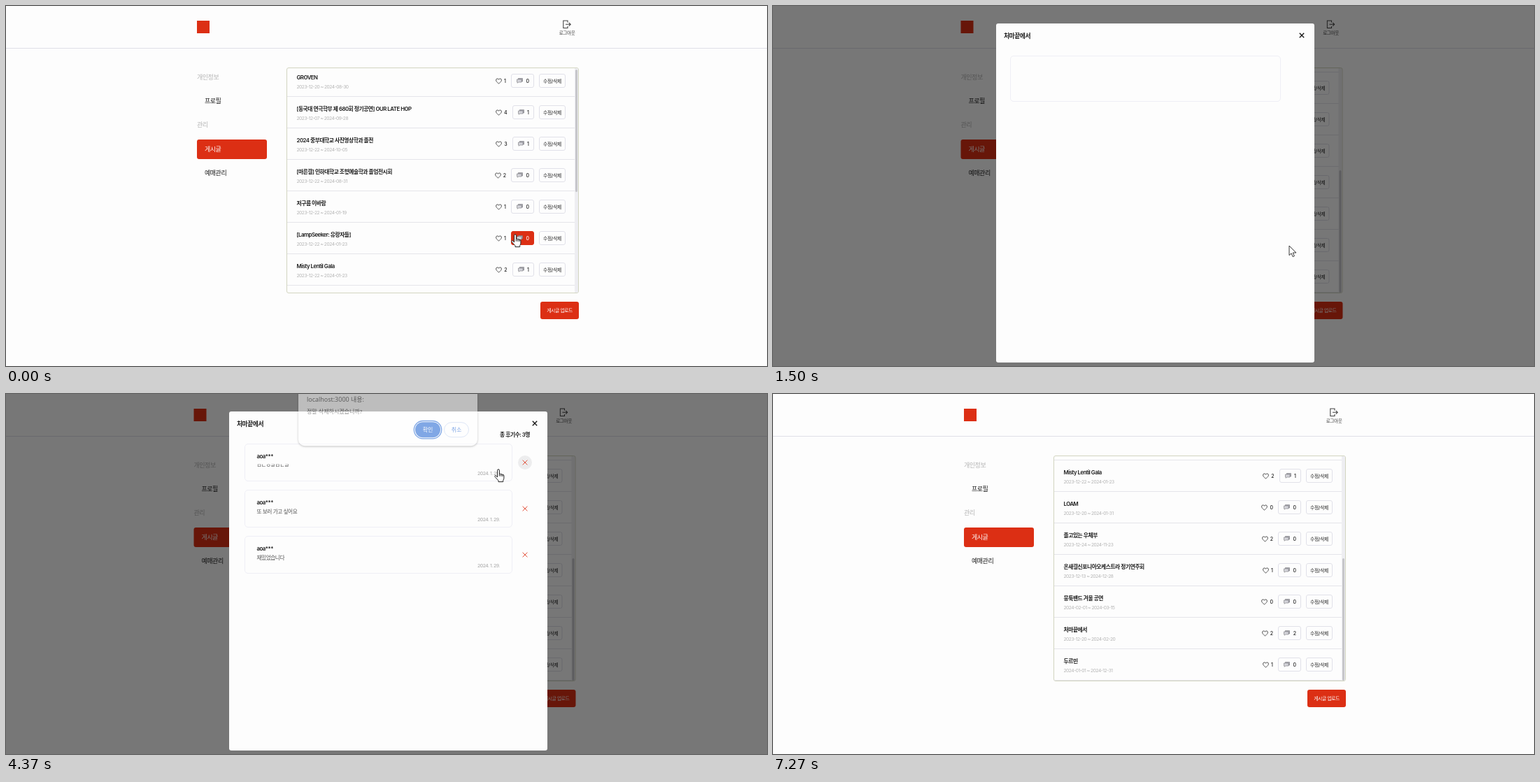
Animation of 1088x515 px, one loop 8.03 s. Source, as an HTML page:

```html
<!DOCTYPE html>
<html lang="ko">
<head>
<meta charset="utf-8">
<title>게시글 관리</title>
<style>
html, body { margin: 0; width: 100%; height: 100%; overflow: hidden; background: #fdfdfd; }
body { font-family: Inter, "Noto Sans CJK KR", sans-serif; letter-spacing: -.03em; color: #1c1c1c; }
#stage { position: relative; width: 1088px; height: 515px; overflow: hidden; background: #fdfdfd; }
#stage div, #stage svg { position: absolute; box-sizing: border-box; }
.t { line-height: 10px; white-space: nowrap; }
.mid { text-align: center; }
.right { text-align: right; }
#page { inset: 0; }
#line { left: 0; top: 60px; width: 1088px; height: 1px; background: #dfdfe8; }
#logo { left: 273px; top: 21px; width: 18px; height: 18px; background: #dc2f14; }
.menu { font-size: 9px; }
.dim { color: #b4b4b4; }
.red { background: #dc2f14; border-radius: 3px; color: #fdfdfd; }
#box { left: 401px; top: 88px; width: 418px; height: 323px; border: 1px solid #d2d5c0; border-radius: 3px; overflow: hidden; }
#rows { left: 0; top: -3.7px; width: 413px; }
.row { left: 0; width: 413px; height: 45px; border-bottom: 1px solid #e5e5ea; }
.row .name { left: 13.5px; top: 11.7px; font-size: 7.8px; font-weight: 600; }
.row .date { left: 13.5px; top: 25.7px; font-size: 6.7px; color: #b4b4b4; }
#stage .tools { right: 15px; top: 12px; height: 20px; display: flex; align-items: center; gap: 7px; font-size: 7px; font-weight: 500; letter-spacing: 0; }
#stage .tools *, #stage .tools svg { position: static; flex: none; }
.like { display: flex; align-items: center; gap: 3px; }
.badge, .edit { height: 20px; border: 1px solid #e1e1e9; border-radius: 3px; display: flex; align-items: center; justify-content: center; }
.badge { padding: 0 6px 0 7px; gap: 4.5px; }
.edit { width: 38px; font-size: 6.7px; letter-spacing: -.03em; }
#track { right: 0; top: 0; width: 5px; height: 321px; background: #eeeef2; }
#thumb { right: 1px; top: 2px; width: 3px; height: 175px; border-radius: 2px; background: #c6c6ca; }
#shade { inset: 0; background: rgba(0, 0, 0, .53); }
#modal { left: 319px; top: 25px; width: 455px; height: 485px; background: #fdfdfd; border-radius: 3px; }
.card { left: 22px; width: 383px; height: 54px; border: 1px solid #efeff6; border-radius: 5px; }
#blank { left: 20px; top: 46px; width: 387px; height: 66px; border: 1px solid #efeff6; border-radius: 5px; }
.half { clip-path: inset(3px 0 0 0); }
.dot { left: 413px; width: 20px; height: 20px; border-radius: 50%; }
#ask { left: 418px; top: -10px; width: 256px; height: 90px; border-radius: 9px; background: #fff; color: #3c3c3c;
  box-shadow: 0 1px 3px rgba(0, 0, 0, .45); font-family: "Open Sans", "Noto Sans CJK KR", sans-serif; letter-spacing: 0; }
.pill { top: 56px; width: 36px; height: 22px; line-height: 20px; border-radius: 11px; font-size: 8px; text-align: center; }
.yes { left: 167px; background: #0b57d0; color: #fff; line-height: 22px; box-shadow: 0 0 0 1px #fff, 0 0 0 2.3px #0b57d0; }
.no { left: 208px; border: 1px solid #c3d3f2; color: #0b57d0; }
#cursor { left: 0; top: 0; }
#cursor svg { overflow: visible; }
</style>
</head>
<body>
<div id="stage">
  <div id="line"></div>
  <div id="page">
    <div id="logo"></div>
    <svg style="left:796px;top:20px" width="12" height="13" fill="none" stroke="#444" stroke-width="1.1">
      <path d="M7 3.5V1H.8v10.5H7V9M4 6.3h7M8.8 3.9l2.4 2.4-2.4 2.4"/>
    </svg>
    <div class="t mid" style="left:782px;top:33.5px;width:40px;font-size:6.7px;color:#444">로그아웃</div>
    <div class="t menu dim" style="left:273px;top:97px">개인정보</div>
    <div class="t menu" style="left:284px;top:131px">프로필</div>
    <div class="t menu dim" style="left:273px;top:165px">관리</div>
    <div class="red" style="left:273px;top:191px;width:100px;height:28px"></div>
    <div class="t menu" style="left:284px;top:200px;color:#fff;font-weight:500">게시글</div>
    <div class="t menu" style="left:284px;top:234px">예매관리</div>
    <div id="box">
      <div id="rows"></div>
      <div id="track"><div id="thumb"></div></div>
    </div>
    <div class="red mid" style="left:764px;top:423px;width:55px;height:25px;line-height:25px;font-size:6.9px;font-weight:500">게시글 업로드</div>
  </div>
  <div id="shade"></div>
  <div id="modal">
    <div class="t" style="left:11px;top:13px;font-size:8.8px;font-weight:600">처마끝에서</div>
    <svg style="left:433px;top:13px" width="8" height="8" stroke="#111" stroke-width="1.3"><path d="M.8.8l6.4 6.4M7.2.8L.8 7.2"/></svg>
    <div id="blank"></div>
    <div id="reviews" style="inset:0">
      <div id="total" class="t right" style="right:25px;top:27.5px;font-size:7.8px;font-weight:600"></div>
      <div id="cards" style="inset:0"></div>
    </div>
  </div>
  <div id="ask">
    <div class="t" style="left:12px;top:19px;font-size:9px">localhost:3000 내용:</div>
    <div class="t" style="left:12px;top:36px;font-size:8px">정말 삭제하시겠습니까?</div>
    <div class="pill yes">확인</div>
    <div class="pill no">취소</div>
  </div>
  <div id="cursor">
    <svg id="arrow" width="12" height="18" fill="#fff" stroke="#222" stroke-width=".9" stroke-linejoin="round">
      <path d="M0 0V13.6L3.1 10.8 5.2 15.7 7.4 14.7 5.3 10H9.9Z"/>
    </svg>
    <svg id="hand" style="left:-6px;top:-1px" width="15" height="20" fill="#fff" stroke="#222" stroke-width="1" stroke-linejoin="round">
      <path d="M4.6 12V2.2a1.4 1.4 0 0 1 2.8 0V7.6q1.2-1.1 2.3.2 1.4-.7 2.2.6 2-.4 2 1.6V13.4q0 1.8-1.2 3V18.6H6V16.8L1.1 11.5q-.8-1.4.5-1.9 1.1-.2 3 2.4ZM7.4 7.6v3M9.7 7.8v3M11.9 8.4v2.6"/>
    </svg>
  </div>
</div>
<script>
const LOOP = 8030, SCROLL = 260, OPEN = 1500, LOADED = 1630, CLOSE = 5700;
const DELETED = [3300, 4950];
const $ = id => document.getElementById(id);
const clamp = v => Math.max(0, Math.min(1, v));
const ramp = (t, a, b) => clamp((t - a) / (b - a));
const within = (t, a, b) => t >= a && t < b;
const show = (el, on) => { el.style.visibility = on ? 'inherit' : 'hidden'; };

const posts = [
  ['GROVEN', '2023-12-20 ~ 2024-08-30', 1, 0],
  ['[동국대 연극학부 제 680회 정기공연] OUR LATE HOP', '2023-12-07 ~ 2024-09-28', 4, 1],
  ['2024 중부대학교 사진영상학과 졸전', '2023-12-22 ~ 2024-10-05', 3, 1],
  ['[마른결] 인하대학교 조형예술학과 졸업전시회', '2023-12-22 ~ 2024-08-31', 2, 0],
  ['저구름 이바람', '2023-12-22 ~ 2024-01-19', 1, 0],
  ['[LampSeeker: 유랑자들]', '2023-12-22 ~ 2024-01-23', 1, 0],
  ['Misty Lentil Gala', '2023-12-22 ~ 2024-01-23', 2, 1],
  ['LOAM', '2023-12-20 ~ 2024-01-31', 0, 0],
  ['졸고있는 우체부', '2023-12-24 ~ 2024-11-23', 2, 0],
  ['온새결신포니아오케스트라 정기연주회', '2023-12-13 ~ 2024-12-28', 1, 0],
  ['뭉툭밴드 겨울 공연', '2024-02-01 ~ 2024-03-15', 0, 0],
  ['처마끝에서', '2023-12-20 ~ 2024-02-20', 2, 4],
  ['두르민', '2024-01-01 ~ 2024-12-31', 1, 0]
];
const heart = `<svg width="9" height="9" fill="none" stroke="#444" stroke-width=".9">
  <path d="M4.5 8C1.8 6 .6 4.6.6 3a2 2 0 0 1 3.9-.7A2 2 0 0 1 8.4 3C8.4 4.600 7.200 6 4.500 8Z"/></svg>`;
const chat = `<svg width="9" height="8" stroke="#77777d" stroke-width=".6">
  <path d="M2.300 .6H8.500V5H2.300Z" fill="#a9a9b0"/><path d="M.5 2H7V6H2.500L1.300 7.300V6H.5Z" fill="#d4d4da"/></svg>`;
$('rows').innerHTML = posts.map(([name, date, likes, talks], i) => `
  <div class="row" style="top:${i * 45}px">
    <div class="t name">${name}</div><div class="t date">${date}</div>
    <div class="tools">
      <div class="like">${heart}<span>${likes}</span></div>
      <div class="badge">${chat}<span>${talks}</span></div>
      <div class="edit">수정/삭제</div>
    </div>
  </div>`).join('');
const badges = [...document.querySelectorAll('.badge')];

const reviews = ['ㅋㄹㅁㅇㄴㄹㅈㅂㄹ', 'ㅁㄴㅇㄹㅁㄴㄹ', '또 보러 가고 싶어요', '재밌었습니다'];
$('cards').innerHTML = reviews.map((text, i) => `
  <div style="left:0;top:${46 + i * 66}px;width:455px;height:54px">
    <div class="card"></div>
    <div class="t" style="left:39.500px;top:13px;font-size:7.8px;font-weight:600">aoa***</div>
    <div class="t ${i < 2 ? 'half' : ''}" style="left:39.500px;top:26.500px;font-size:7.7px;color:#555">${text}</div>
    <div class="t right" style="right:68px;top:38px;font-size:6.8px;font-weight:500;color:#b0b0b0">2024. 1. 29.</div>
    <div class="dot" style="top:17px"></div>
    <svg style="left:419px;top:23px" width="8" height="8" stroke="#e0452c" stroke-width=".9"><path d="M.6.6l6.800 6.800M7.400 .6L.6 7.400"/></svg>
  </div>`).join('');
const cards = [...$('cards').children];
const dots = [...document.querySelectorAll('.dot')];

// cursor stops: time, x, y
const path = [
  [0, 728, 327], [450, 728, 327], [830, 727, 333], [870, 727, 333], [1100, 738, 343],
  [1600, 738, 343], [1870, 752, 172], [2200, 752, 172], [2480, 742, 98], [2700, 742, 98],
  [3130, 586, 66], [3230, 597, 62], [3630, 597, 62], [3950, 742, 98], [4290, 742, 98],
  [4370, 704, 108], [4750, 600, 60], [4980, 600, 60], [5540, 913, 220], [5870, 913, 220],
  [6500, 812, 419], [6700, 812, 419], [6860, 762, 418], [7270, 1002, 326]
];
function cursorAt(t) {
  const i = path.findIndex(p => p[0] > t);
  if (i < 0) return path[path.length - 1].slice(1);
  const [a, x, y] = path[i - 1], [b, u, v] = path[i];
  const p = ramp(t, a, b), e = p * p * (3 - 2 * p);
  return [x + (u - x) * e, y + (v - y) * e];
}

function paintBadge(el, k) {
  const mix = (a, b) => Math.round(a + (b - a) * k);
  el.style.background = k ? `rgb(${mix(253, 220)},${mix(253, 47)},${mix(253, 20)})` : '';
  el.style.borderColor = k ? `rgb(${mix(225, 220)},${mix(225, 47)},${mix(233, 20)})` : '';
  el.style.color = k > .5 ? '#fff' : '';
}

function render(t) {
  const scroll = SCROLL * (1 - Math.pow(1 - ramp(t, 30, 830), 1.88));
  $('rows').style.transform = `translateY(${-scroll}px)`;
  $('thumb').style.transform = `translateY(${scroll * 144 / SCROLL}px)`;

  paintBadge(badges[5], t < 700 ? 1 : 0);
  paintBadge(badges[11], t < OPEN ? ramp(t, 850, 980) : 0);
  badges[11].style.filter = within(t, 1270, 1300) ? 'brightness(.9)' : '';
  badges[11].lastChild.textContent = t < CLOSE ? 4 : 2;

  const open = within(t, OPEN, CLOSE), loaded = t >= LOADED;
  $('page').style.transform = open ? 'translateX(-4.5px)' : '';
  show($('shade'), open);
  show($('modal'), open);
  show($('blank'), !loaded);
  show($('reviews'), loaded);

  const gone = DELETED.filter(d => t >= d).length;
  $('total').textContent = `총 후기수: ${reviews.length - gone}명`;
  cards.forEach((c, i) => {
    show(c, i >= gone);
    c.style.top = 46 + (i - gone) * 66 + 'px';
  });
  const hover = within(t, 2440, DELETED[0]) || within(t, 3900, DELETED[1]);
  dots.forEach((d, i) => { d.style.background = hover && i === gone ? '#ededee' : ''; });

  const ask = ramp(t, 2700, 2800) - ramp(t, 3230, 3320) + ramp(t, 4330, 4410) - ramp(t, 4850, 4940);
  $('ask').style.opacity = ask;
  $('ask').style.transform = `translateY(${-12 * (1 - ask)}px)`;

  const [x, y] = cursorAt(t);
  const hand = t < OPEN || within(t, 2440, 2780) || within(t, 3900, 4430);
  $('cursor').style.transform = `translate(${x}px, ${y}px)`;
  show($('cursor'), t < 7270);
  show($('arrow'), !hand);
  show($('hand'), hand);
}

const start = performance.now();
function tick() {
  render((performance.now() - start) % LOOP);
  requestAnimationFrame(tick);
}
tick();
</script>
</body>
</html>
```
